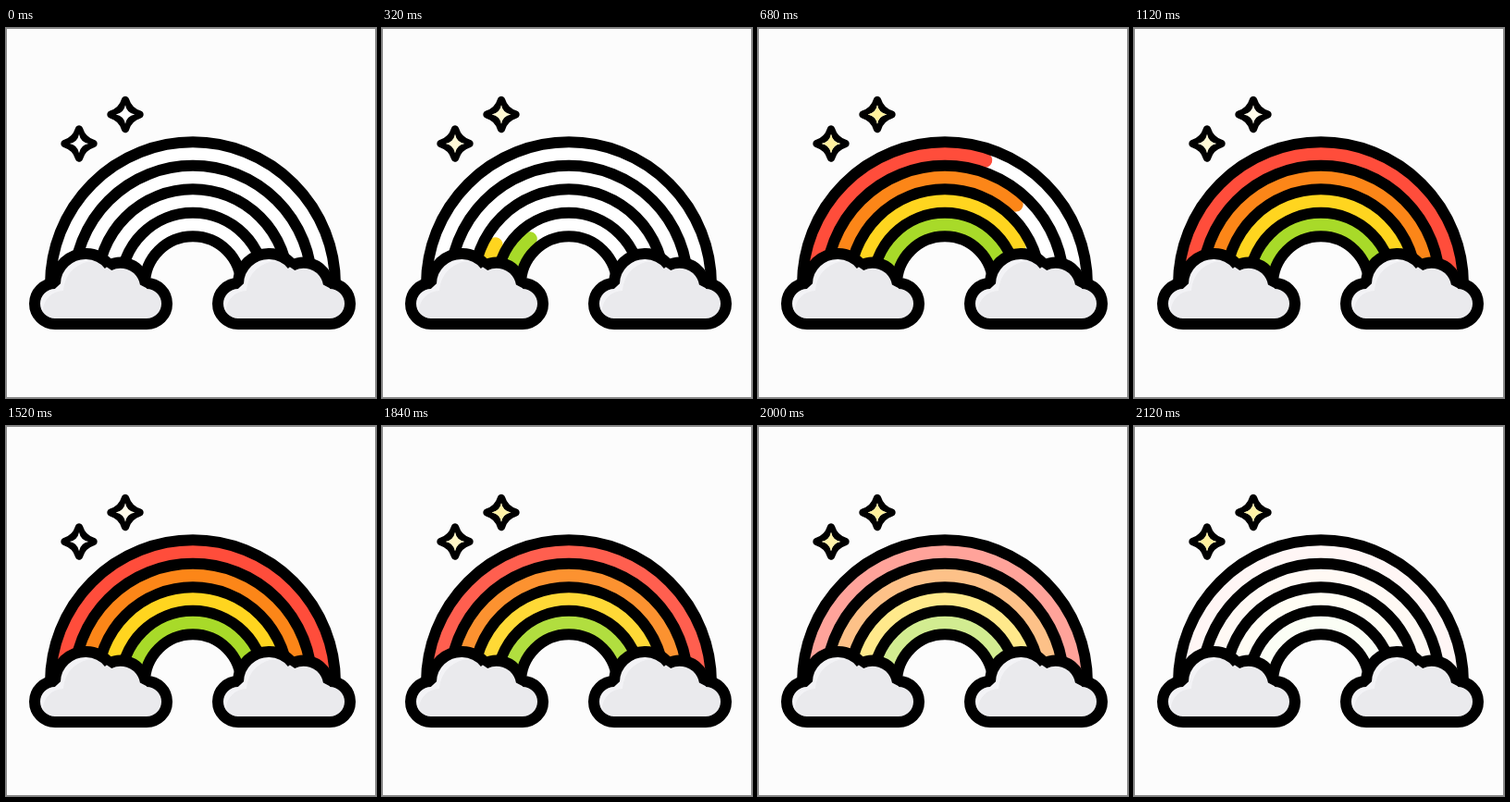
Recreate the animation shown at these times as an HTML page with a canvas. Size 400x400 px, loop 2.16 s.

```html
<!DOCTYPE html>
<html lang="en">
<head>
<meta charset="utf-8">
<title>Rainbow</title>
<style>
html, body { margin: 0; width: 100%; height: 100%; overflow: hidden; background: #fcfcfc; }
canvas { display: block; width: 100vw; height: 100vh; }
</style>
</head>
<body>
<canvas id="stage"></canvas>
<script>
const SIZE = 400, LOOP = 2160, LINE = 12;
const CX = 202, CY = 277.3, INNER = 52, GAP = 25.5;
const COLORS = ['#a8da29', '#ffd51f', '#fc8618', '#ff4d3b']; // inner to outer
const STARS = [
  { x: 79, y: 125, half: 720 },
  { x: 129, y: 93.5, half: 660 }
];

const canvas = document.getElementById('stage');
const ctx = canvas.getContext('2d');
const dpr = window.devicePixelRatio || 1;
canvas.width = canvas.height = SIZE * dpr;

const progress = (t, start, length) => Math.min(1, Math.max(0, (t - start) / length));
const smooth = u => u * u * (3 - 2 * u);
const pulse = (t, half) => 0.5 - 0.5 * Math.cos(Math.PI * t / half);

function cloudPath() {
  const p = new Path2D();
  const lobe = (x, y, r, x0, y0, x1, y1) =>
    p.arc(x, y, r, Math.atan2(y0 - y, x0 - x), Math.atan2(y1 - y, x1 - x));
  lobe(53, 298, 22, 53, 320, 53, 276);
  lobe(86, 277, 33, 53, 276, 111.4, 256.2);
  lobe(123.9, 281, 27.3, 111.4, 256.6, 151.2, 276.5);
  lobe(152, 298, 22, 152, 276, 152, 320);
  p.closePath();
  return p;
}

// four points at distance r, sides bent toward (c, c)
function starPath(r, c) {
  const p = new Path2D();
  p.moveTo(0, -r);
  p.quadraticCurveTo(c, -c, r, 0);
  p.quadraticCurveTo(c, c, 0, r);
  p.quadraticCurveTo(-c, c, -r, 0);
  p.quadraticCurveTo(-c, -c, 0, -r);
  p.closePath();
  return p;
}

const CLOUD = cloudPath();
const STAR_BODY = starPath(15.5, 3.6), STAR_CORE = starPath(10.2, 1.6);

function arch(r, sweep, width, color, cap) {
  ctx.beginPath();
  ctx.arc(CX, CY, r, Math.PI, Math.PI * (1 + sweep));
  ctx.lineWidth = width;
  ctx.lineCap = cap;
  ctx.strokeStyle = color;
  ctx.stroke();
}

function drawRainbow(t) {
  arch(INNER + 2 * GAP, 1, 4 * GAP, '#fff', 'butt');
  ctx.globalAlpha = 1 - progress(t, 1700, 430) ** 2;
  COLORS.forEach((color, i) => {
    const sweep = smooth(progress(t, 72 + i * 66.7, 720));
    if (sweep > 0) arch(INNER + (i + 0.5) * GAP, sweep, 16, color, 'round');
  });
  ctx.globalAlpha = 1;
  for (let i = 0; i < 5; i++) arch(INNER + i * GAP, 1, LINE, '#000', 'butt');
}

function outline(path, width, join) {
  ctx.lineWidth = width;
  ctx.lineJoin = join;
  ctx.strokeStyle = '#000';
  ctx.stroke(path);
}

function drawCloud(x) {
  ctx.save();
  ctx.translate(x, 0);
  ctx.fillStyle = '#f3f3f6';
  ctx.fill(CLOUD);
  ctx.save();
  ctx.clip(CLOUD);
  ctx.fillStyle = '#eaeaed';
  ctx.fillRect(104, 240, 80, 90);
  ctx.translate(9, 8);
  ctx.fill(CLOUD);
  ctx.restore();
  outline(CLOUD, LINE, 'bevel');
  ctx.restore();
}

function drawStar(x, y, glow) {
  ctx.save();
  ctx.translate(x, y);
  ctx.fillStyle = '#000';
  ctx.fill(STAR_BODY);
  outline(STAR_BODY, 8.4, 'round');
  ctx.fillStyle = '#fff';
  ctx.fill(STAR_CORE);
  ctx.globalAlpha = glow;
  ctx.fillStyle = '#fff09c';
  ctx.fill(STAR_CORE);
  ctx.restore();
}

function drawFrame() {
  ctx.lineWidth = 1;
  ctx.lineJoin = 'miter';
  ctx.strokeStyle = '#8a8a8a';
  ctx.strokeRect(0.5, 0.5, SIZE - 1, SIZE - 1);
}

function draw(t) {
  ctx.setTransform(dpr, 0, 0, dpr, 0, 0);
  ctx.fillStyle = '#fcfcfc';
  ctx.fillRect(0, 0, SIZE, SIZE);
  drawFrame();
  drawRainbow(t);
  drawCloud(0);
  drawCloud(198);
  STARS.forEach(s => drawStar(s.x, s.y, pulse(t, s.half)));
}

const begin = performance.now();
function tick() {
  const t = (performance.now() - begin) % LOOP;
  draw(Math.floor(t / 40) * 40);
  requestAnimationFrame(tick);
}
draw(0);
requestAnimationFrame(tick);
</script>
</body>
</html>
```
